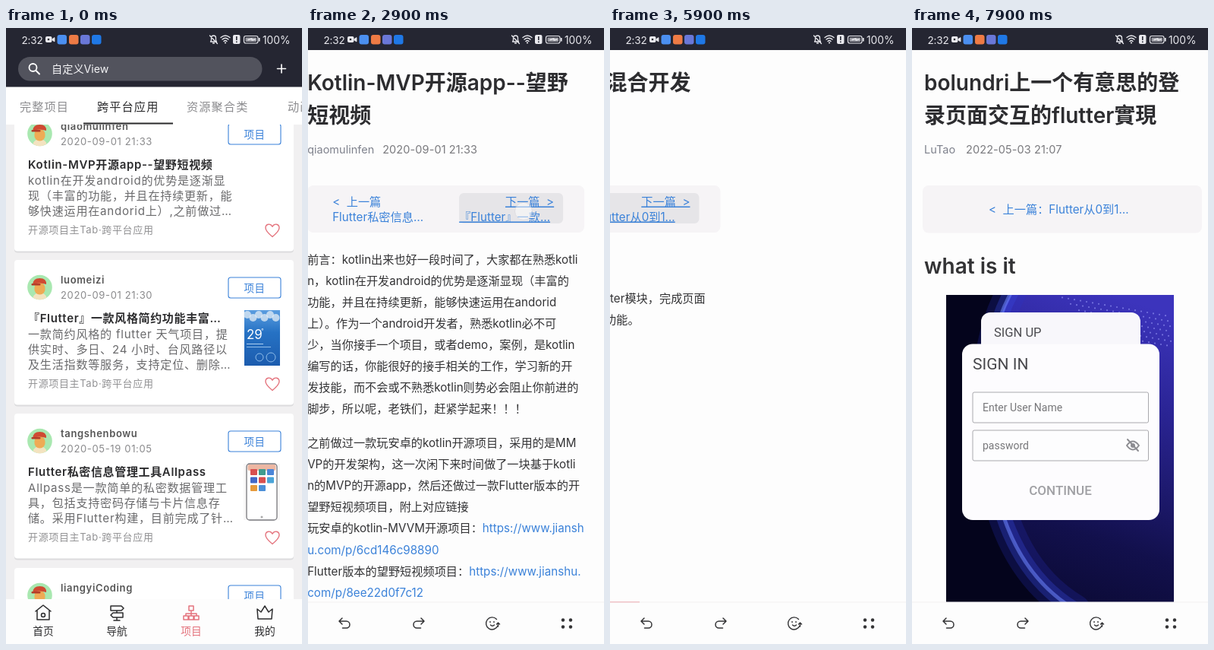
Animation of 390x810 px, one loop 8000 ms. Source, as an HTML page:

```html
<!DOCTYPE html>
<html lang="zh-CN">
<head>
<meta charset="utf-8">
<title>Articles</title>
<style>
html, body { margin: 0; width: 100%; height: 100%; overflow: hidden; background: #fdfdfd; }
svg { display: block; width: 390px; height: 810px; }
text { white-space: pre; font-family: Inter, "Noto Sans CJK SC", "Noto Sans CJK", sans-serif; }
.ui text { font-family: Roboto, sans-serif; }
.hit rect { opacity: 0; }
.hit.on rect { opacity: 1; }
.hit.on text { text-decoration: underline; }
</style>
</head>
<body>
<svg id="stage" viewBox="0 0 390 810"></svg>
<script>
const INK = '#333335', BLUE = '#3b82d9', RED = '#e4737d', DARK = '#252632';
const SLIDE = 300, LOOP = 8000, STEP = 100;

const T = (x, y, size, str, fill = INK, more = '') =>
  `<text x="${x}" y="${y}" font-size="${size}" fill="${fill}" ${more}>${str}</text>`;
const R = (x, y, w, h, fill, r = 0, more = '') =>
  `<rect x="${x}" y="${y}" width="${w}" height="${h}" rx="${r}" fill="${fill}" ${more}/>`;
const C = (x, y, r, fill, more = '') => `<circle cx="${x}" cy="${y}" r="${r}" fill="${fill}" ${more}/>`;
const P = (d, stroke, w = 1.5, more = 'fill="none"') =>
  `<path d="${d}" stroke="${stroke}" stroke-width="${w}" stroke-linecap="round" stroke-linejoin="round" ${more}/>`;
const at = (x, y, inner) => `<g transform="translate(${x} ${y})">${inner}</g>`;
const BOLD = 'font-weight="600"', MID = 'text-anchor="middle"', END = 'text-anchor="end"';
const spaced = n => `letter-spacing="${n}"`;
const lines = (y, rows, x = 16) => rows.map((s, i) => T(x, y + i * 28.1, 15.2, s)).join('');
const link = s => `<tspan fill="${BLUE}">${s}</tspan>`;
const head = (y, s, size = 23.8) => T(16, y, size, s, INK, BOLD);

// Status bar
function status() {
  const W = '#e9e9ee';
  return R(0, 0, 390, 29, DARK) +
    T(20.5, 20.5, 13.6, '2:32', W, spaced(-.2)) +
    R(52, 11, 8.5, 8, W, 2) + P('M61 14.5l3-2v5.5l-3-2z', W, .8, `fill="${W}"`) + C(56, 15, 1.3, DARK) +
    R(67.5, 9, 12.5, 12.5, '#4b8ff0', 3) + R(83, 9, 12.5, 12.5, '#ee7b45', 3) +
    R(98, 9, 12.5, 12.5, '#6a78d8', 3) + R(113, 9, 12.5, 12.5, '#1f78e6', 3) +
    P('M269.5 18h8l-1-2v-3a3 3 0 0 0-6 0v3zM272.5 20h2M268.5 10l10 10.5', W, 1.3) +
    P('M283 12.5q6-5 12 0M285 15q4-3.5 8 0M287 17.5q2-1.8 4 0', W, 1.4) + C(289, 19.5, 1.1, W) +
    R(299, 9, 9.5, 12, W, 2) + R(303, 11, 1.6, 5, DARK) + R(303, 17.5, 1.6, 1.6, DARK) +
    R(313.5, 10.5, 18.5, 9.5, 'none', 2.5, `stroke="${W}" stroke-width="1.2"`) +
    R(315.5, 12.5, 14.5, 5.5, '#9a9aa2', 1) + P('M319 15.5l5-1.5v2l4-1', W, 1.4) + R(333, 13, 1.6, 4.5, W) +
    T(338, 20.5, 13.8, '100%', W);
}

// Project list
function avatar(x, y) {
  return at(x, y, C(0, 0, 16.3, '#a9e8b0') +
    '<path d="M-9 13.5Q-7 7 0 7T9 13.5Q0 19-9 13.5Z" fill="#f3e3c0"/>' +
    R(-7, -6, 14, 15.5, '#eeab55', 6.5) +
    '<path d="M-9-4Q-9-12 0-12T8.5-4Q0-7-9-4Z" fill="#cf4a32"/>' + R(-11, -5, 12, 2.5, '#b33c28', 1));
}
const heart = P('M0 8.5C-5 4.5-9 1-9-3.2C-9-8.5-2.5-9.5 0-4.8C2.5-9.5 9-8.5 9-3.2C9 1 5 4.5 0 8.5Z', RED, 1.4);

function weatherThumb() {
  let s = R(314, 66, 47, 73, 'url(#sky)');
  for (let i = 0; i < 6; i++) s += C(318 + i * 7.5, 72 + (i % 2) * 4, 5, '#e4edf6', 'opacity=".75"');
  return s + T(317, 104, 17, '29', '#fff') + T(336, 96, 8, '°', '#fff') +
    R(317, 110, 22, 1, '#a9cdf0') + R(317, 114, 32, 1, '#8fbdea') +
    C(334, 128, 5, 'none', 'stroke="#8fbdea"') + C(349, 128, 6, 'none', 'stroke="#8fbdea"');
}
function phoneThumb() {
  let s = R(313, 66, 48, 74, '#f8f7f7') + R(317, 66, 40, 74, '#fff', 4, 'stroke="#77777c" stroke-width="1.3"') +
    R(318.5, 67, 37, 8, '#edb7a2', 2);
  const hues = ['#d85050', '#3f9c8f', '#4b86d8', '#4168c8', '#d84f4f', '#4aa4d8', '#e69a3c', '#4b8fd8'];
  hues.forEach((c, i) => s += R(322 + i % 3 * 11, 73 + (i / 3 | 0) * 10.5, 9, 8, c, 1));
  return s + C(337, 136, 1.5, '#aaa');
}
function card(y, name, date, title, desc, thumb = '') {
  return at(0, y, R(11, 1, 368, 191.5, '#dcdcde', 4) + R(11, 0, 368, 190.5, '#fff', 4) +
    avatar(44.5, 36) +
    T(72, 31, 13, name, '#555', BOLD + spaced(.65)) +
    T(72, 51, 13, date, '#8a8a8c', spaced(.65)) +
    R(293, 23, 69, 27, '#fff', 3, `stroke="${BLUE}" stroke-width="1.1"`) +
    T(327.5, 41.5, 13.5, '项目', BLUE, MID + spaced(.6)) +
    T(29, 82, 15, title, '#2c2c2e', BOLD + spaced(.65)) +
    desc.map((s, i) => T(29, 102.5 + i * 20.2, 15.1, s, '#6a6a6c', spaced(.75))).join('') +
    T(29, 166.5, 13, '开源项目主Tab·跨平台应用', '#929294', spaced(.65)) +
    thumb + at(351, 163, heart));
}
function list() {
  const tab = (x, s, c = '#8d8d90') => T(x, 108.5, 15.2, s, c, spaced(1.1));
  const item = (x, s, icon, c = '#2c2c2e') =>
    at(x, 769, P(icon, c, 1.5)) + T(x, 798, 13.8, s, c, MID);
  return R(0, 28, 390, 782, '#f1f0f1') +
    card(103, 'qiaomulinfen', '2020-09-01 21:33', 'Kotlin-MVP开源app--望野短视频',
      ['kotlin在开发android的优势是逐渐显', '现（丰富的功能，并且在持续更新，能', '够快速运用在andorid上）,之前做过…']) +
    card(305, 'luomeizi', '2020-09-01 21:30', '『Flutter』一款风格简约功能丰富…',
      ['一款简约风格的 flutter 天气项目，提', '供实时、多日、24 小时、台风路径以', '及生活指数等服务，支持定位、删除…'], weatherThumb()) +
    card(507, 'tangshenbowu', '2020-05-19 01:05', 'Flutter私密信息管理工具Allpass',
      ['Allpass是一款简单的私密数据管理工', '具，包括支持密码存储与卡片信息存', '储。采用Flutter构建，目前完成了针…'], phoneThumb()) +
    card(710, 'liangyiCoding', '', '', []) +
    R(0, 28, 390, 50, DARK) + R(16, 38, 321.5, 31.5, '#52535d', 15.7) +
    C(35.5, 52, 5, 'none', 'stroke="#fff" stroke-width="1.8"') + P('M39.5 56l4.5 4.5', '#fff', 2) +
    T(60, 59, 14.2, '自定义View', '#f4f4f6') + P('M357.5 53.5h11M363 48v11', '#fff', 1.6) +
    R(0, 77.5, 390, 49.5, '#fff') +
    tab(18, '完整项目') + tab(120, '跨平台应用', '#2a2a2c') + tab(238, '资源聚合类') + tab(371, '动画') +
    R(102, 124.5, 118, 2, '#2a2a2c') +
    R(0, 751, 390, 59, '#fdfdfd') +
    item(49, '首页', 'M-10-2L0-10L10-2M-8-3V9H8V-3M-2.5 3a2.5 2.5 0 1 0 5 0a2.5 2.5 0 1 0-5 0') +
    item(146, '导航', 'M-8-9H6L9-6L6-3H-8ZM8 0H-5L-8 3L-5 6H8ZM0-3V0M0 6V10M-4 10H4') +
    item(244, '项目', 'M-3-9H3V-3H-3ZM-10 4H-4V9H-10ZM-3 4H3V9H-3ZM4 4H10V9H4ZM0-3V4M-7 4V1H7V4', RED) +
    item(341, '我的', 'M-9 8L-10-5L-5-1L0-9L5-1L10-5L9 8Z');
}

// Article pages
const meta = (title, by, dateX, date) =>
  title.map((s, i) => T(16, 82 + i * 42.5, 28, s, '#2d2d30', BOLD)).join('') +
  T(16, 165, 14.5, by, '#7f828d') + T(dateX, 165, 14.5, date, '#7a7a7e', spaced(.1));
const links = (prev, next) => R(16, 207, 365, 62, '#f6f4f6', 8) +
  T(49, 233.5, 15.2, '&lt;  上一篇', BLUE) + T(49, 253.5, 15.2, prev, BLUE) +
  `<g class="hit">${R(216, 217, 137, 40, '#e6e5e8', 6)}` +
  T(341, 233.5, 15.2, '下一篇  &gt;', BLUE, END) + T(216, 253.5, 15.2, next, BLUE) + '</g>';

function signIn() {
  let dots = '';
  for (let r = 0; r < 7; r++) for (let c = 0; c < 20; c++) {
    const x = 190 + c * 8 + r * 3, y = 353 + r * 7 + c * 1.4;
    if (x < 342 && c > r) dots += C(x, y, 1.1, '#8b8cf0', 'opacity=".7"');
  }
  const arc = 'M132 345Q85 430 104 570T215 765';
  const glow = (w, c, o) => P(arc, c, w, `fill="none" opacity="${o}"`);
  const field = (y, s) => R(80, y, 231.5, 40, '#fdfdfe', 2, 'stroke="#a9a9ad"') + T(93, y + 24.5, 14, s, '#77777a');
  return '<g id="shot" class="ui"><g clip-path="url(#frame)">' + R(45, 351, 300, 405, '#04041c') +
    `<path d="${arc}H345V345Z" fill="url(#night)"/>` +
    glow(40, '#2a35c8', .22) + glow(20, '#3a4ae0', .3) + glow(5, '#7088ff', .55) + dots + '</g>' +
    R(91, 374, 210, 90, '#f8f7fb', 12) + R(66, 415.5, 260, 231.5, '#fdfcfe', 14) +
    T(108, 406, 16.5, 'SIGN UP', '#4c4c50') + T(80, 449, 21, 'SIGN IN', '#47474b') +
    field(479, 'Enter User Name') + field(529, 'password') +
    P('M283 549Q291 538 299 549Q291 560 283 549Z', '#8d8d92', 2) + C(291, 549, 3, '#8d8d92') + P('M284 541l14 15', '#8d8d92', 2) +
    T(195.5, 614, 17, 'CONTINUE', '#a0a0a4', MID + ' font-weight="500"') + '</g>';
}

const pages = [
  { start: 450, load: 1100, body: meta(['Flutter私密信息管理工具All', 'pass'], 'tangshenbowu', 129, '2020-05-19 01:05') +
    links('Flutter仿随语客…', 'Kotlin-MVP开源…') + head(321, 'Allpass', 28) + head(375, '介绍') +
    C(195.5, 447, 37, '#8560e8') +
    lines(528, ['Allpass是一款简单的私密数据管理工具，包括支持密', '码存储与卡片信息存储。采用Flutter构建，目前完成', '了针对安卓的适配。']) +
    ['密码与卡片信息管理', '支持指纹解锁软件', 'AES256位加密', '支持从csv文件中导入或导出为csv文件', '支持从Zormue中导入密码']
      .map((s, i) => C(41, 620 + i * 30.5, 2.4, INK) + T(51, 625.5 + i * 30.5, 15.2, s)).join('') },
  { start: 1960, load: 2400, body: meta(['Kotlin-MVP开源app--望野', '短视频'], 'qiaomulinfen', 115, '2020-09-01 21:33') +
    links('Flutter私密信息…', '『Flutter』一款…') +
    lines(309.5, ['前言：kotlin出来也好一段时间了，大家都在熟悉kotli', 'n，kotlin在开发android的优势是逐渐显现（丰富的',
      '功能，并且在持续更新，能够快速运用在andorid', '上）。作为一个android开发者，熟悉kotlin必不可', '少，当你接手一个项目，或者demo，案例，是kotlin',
      '编写的话，你能很好的接手相关的工作，学习新的开', '发技能，而不会或不熟悉kotlin则势必会阻止你前进的', '脚步，所以呢，老铁们，赶紧学起来！！！']) +
    lines(551, ['之前做过一款玩安卓的kotlin开源项目，采用的是MM', 'VP的开发架构，这一次闲下来时间做了一块基于kotli', 'n的MVP的开源app，然后还做过一款Flutter版本的开',
      '望野短视频项目，附上对应链接', '玩安卓的kotlin-MVVM开源项目：' + link('https://www.jiansh'), link('u.com/p/6cd146c98890'),
      'Flutter版本的望野短视频项目：' + link('https://www.jianshu.'), link('com/p/8ee22d0f7c12')]) },
  { start: 2860, load: 3270, body: meta(['『Flutter』一款风格简约功', '能丰富的天气'], 'luomeizi', 82, '2020-09-01 22:15') +
    links('Kotlin-MVP开源…', 'VAndroid:基于 …') + head(317, '简介') +
    T(16, 367.5, 15.2, '简约不简单，功能不复杂', INK, 'font-style="italic"') +
    lines(412, ['一款简约风格的 flutter 天气项目，提供实时、多日、', '24 小时、台风路径以及生活指数等服务，支持定位、', '删除、搜索等操作。']) +
    lines(512.5, ['项目使用Flutter开发，包含状态管理、网络请求、数', '据存储、多语言切换、自定义动画，三方统计，事件', '总线等等，内容充实且丰富。']) +
    lines(613.5, ['更多信息与详细说明前往 ' + link('『Flutter』一款风格简约功'), link('能丰富的天气')]) },
  { start: 3665, load: 4100, body: meta(['VAndroid:基于 Kotlin 的', '安卓客户端'], 'momulin', 83, '2021-03-14 20:26') +
    links('『Flutter』一款…', 'Android+Flutter…') + head(317, '项目介绍') +
    lines(361, ['一款采用Kotlin编写的安卓客户端，使用MVVM架构，', '界面简洁，功能完整，适合学习和参考。']) +
    lines(434, ['项目包含首页、导航、项目以及个人中心等页面，', '支持搜索、收藏与夜间模式。']) },
  { start: 4700, load: 5300, body: meta(['Android+Flutter混合开发', '项目实践'], 'momulin', 83, '2021-09-06 22:18') +
    links('VAndroid:基于 …', 'Flutter从0到1…') + head(317, '前言') +
    lines(361, ['在现有的Android项目中接入Flutter模块，完成页面', '跳转、数据通信以及混合打包等功能。']) },
  { start: 5730, load: 6180, body: meta(['Flutter从0到1开发一个app:', '觅晴空'], 'ZhengTaolin417', 146, '2022-02-20 21:05') +
    links('Android+Flutter…', 'bolundri上一个…') + head(316, '觅晴空') +
    lines(361, ['觅晴空主要功能包含关注城市天气页面，城市管理页', '面，城市搜索页面等功能，小到小时级天气信息，空', '气质量信息以及风力风向，大到7天天气预报以及全国', '范围内的天气云图。觅晴空懂天气更懂你。']) +
    lines(490, ['觅晴空主要采用Flutter技术开发，采用现阶段非常流', '行的Bloc框架。']) +
    C(195, 612.5, 60, '#8fd1f8') + head(724, '功能介绍') +
    C(41, 757, 2.4, INK) + T(51, 762.5, 15.2, '主页面，可以展示多个城市的天气信息，支持下') },
  { start: 6760, load: 7160, body: meta(['bolundri上一个有意思的登', '录页面交互的flutter實現'], 'LuTao', 71, '2022-05-03 21:07') +
    R(14, 207, 368, 62.5, '#f6f4f6', 8) + T(101, 244, 15.2, '&lt;  上一篇：Flutter从0到1…', BLUE) +
    head(323, 'what is it', 28) + signIn() }
];

const toolbar = R(0, 755, 390, 55, '#fdfdfd') + R(0, 754.5, 390, 1, '#f3f1f2') +
  P('M45 776l-4 4l4 4M41.5 780h9a4.5 4.5 0 0 1 0 9h-5', INK) +
  P('M149 776l4 4l-4 4M152.5 780h-9a4.5 4.5 0 0 0 0 9h5', INK) +
  P('M248.5 777.5a8 8 0 1 0 1.5 8.5M250.5 787v-4.5M248.5 784l2-2l2 2M240.5 785q2.5 2.5 5 0', INK, 1.4) +
  C(240, 781, .9, INK) + C(245, 781, .9, INK) +
  [[336, 778.5], [346, 778.5], [336, 787.5], [346, 787.5]].map(p => C(...p, 2.2, INK)).join('');

const stage = document.getElementById('stage');
stage.innerHTML = `<defs>
  <linearGradient id="sky" x2="0" y2="1"><stop stop-color="#5b9ee0"/><stop offset=".4" stop-color="#2672c4"/><stop offset="1" stop-color="#1c5cae"/></linearGradient>
  <linearGradient id="night" x1=".6" x2=".4" y2="1"><stop stop-color="#3c34bc"/><stop offset=".3" stop-color="#2a2494"/><stop offset=".75" stop-color="#12104c"/><stop offset="1" stop-color="#0b0a34"/></linearGradient>
  <clipPath id="frame"><rect x="45" y="351" width="300" height="405"/></clipPath></defs>` +
  R(0, 0, 390, 810, '#fdfdfd') +
  pages.map(p => `<g class="page">${p.body}</g>`).join('') +
  `<g id="tools">${toolbar}</g>` + R(0, 751, 0, 4, RED, 0, 'id="bar"') +
  `<g id="list">${list()}</g>` +
  C(0, 0, 11.5, '#fff', 'id="dot" stroke="#d5d3d8" opacity=".5"') + status();

const el = id => document.getElementById(id);
const sheets = [...stage.querySelectorAll('.page')];
const tools = el('tools'), bar = el('bar'), listEl = el('list'), dot = el('dot'), shot = el('shot');
const show = (node, on) => node.setAttribute('display', on ? 'inline' : 'none');
const shift = (node, x) => node.setAttribute('transform', `translate(${x} 0)`);
const clamp = v => Math.min(1, Math.max(0, v));
const slide = (t, start) => 390 * (1 - Math.cos(Math.PI * clamp((t - start) / SLIDE))) / 2;

function drawBar(t) {
  const p = pages.filter(q => t > q.start + 90).pop();
  const age = p ? t - p.load : 1e4;
  show(bar, age < 320);
  if (age >= 320) return;
  const part = age > 220 ? .2 + .8 * (age - 220) / 100 : t - p.start < 250 ? .1 : .2;
  const thin = age < 0;
  bar.setAttribute('width', 390 * part);
  bar.setAttribute('y', thin ? 754 : 751.5);
  bar.setAttribute('height', thin ? 1.5 : 4);
  bar.setAttribute('opacity', thin ? .4 : 1);
}

function draw(t) {
  const first = slide(t, pages[0].start);
  show(listEl, first < 390);
  shift(listEl, -first);
  shift(tools, 390 - first);
  let touch = t >= 300 && t < 500 ? [200, 625] : null;
  pages.forEach((p, i) => {
    const leave = pages[i + 1] ? pages[i + 1].start : Infinity;
    const on = t >= p.load && t < leave + SLIDE;
    show(sheets[i], on);
    if (!on) return;
    shift(sheets[i], -slide(t, leave));
    const hit = sheets[i].querySelector('.hit');
    if (hit) hit.classList.toggle('on', t >= leave - 170);
    if (t >= leave - 170 && t < leave + 60) touch = t < leave ? [270, 234] : [284, 241];
  });
  show(dot, touch);
  if (touch) { dot.setAttribute('cx', touch[0]); dot.setAttribute('cy', touch[1]); }
  show(shot, t >= 7400);
  drawBar(t);
}

const began = performance.now();
function tick() {
  const t = (performance.now() - began) % LOOP;
  draw(Math.floor(t / STEP) * STEP);
  requestAnimationFrame(tick);
}
tick();
</script>
</body>
</html>
```
